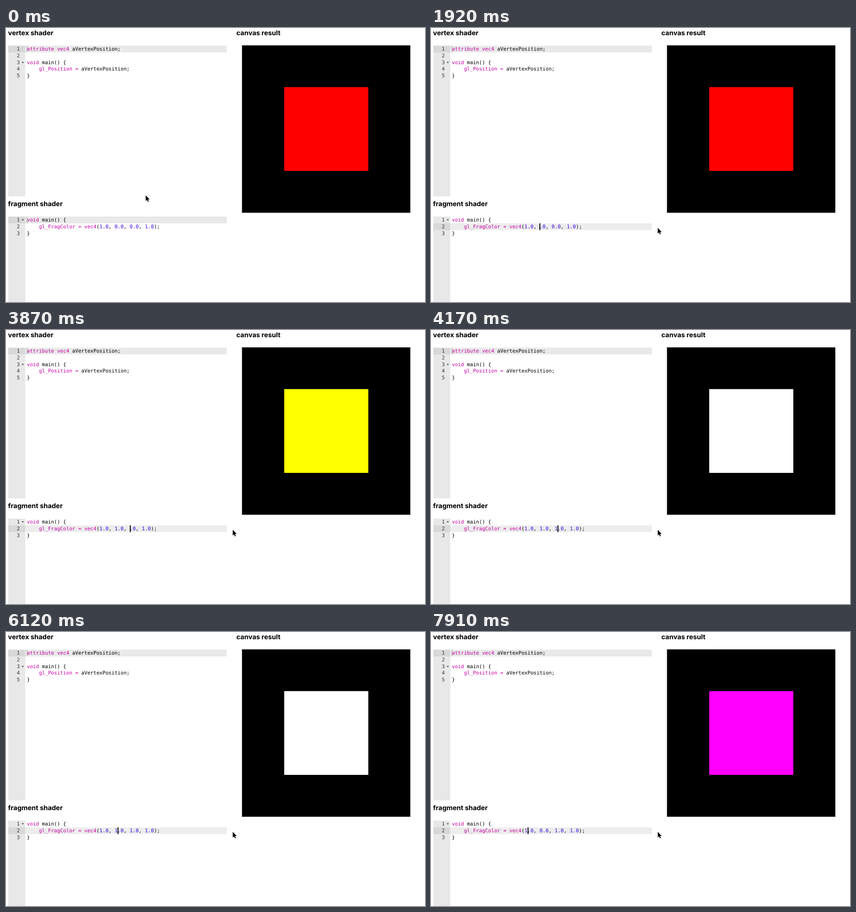
An HTML page with a canvas that plays this animation: 924x606 px, repeating every 8 s.

```html
<!DOCTYPE html>
<html lang="en">
<head>
<meta charset="utf-8">
<title>Shader editor</title>
<style>
  html, body { margin: 0; width: 100%; height: 100%; overflow: hidden; background: #fff; }
  canvas { display: block; }
</style>
</head>
<body>
<canvas id="stage" width="924" height="606"></canvas>
<script>
const ctx = document.getElementById('stage').getContext('2d');
const LOOP = 8000, ROW = 14.8, COL = 6.67, LEFT = 46;
const HEADING = '700 14.8px Inter, "Open Sans", sans-serif';
const CODE = '11.1px "DejaVu Sans Mono", "Liberation Mono", monospace';
const KEYWORD = '#c800a4', NUMBER = '#3a00dc';
const TOKENS = /(attribute|void|vec4|gl_\w+|=)|(\d*\.\d+)|./g;

const VERTEX = [
  'attribute vec4 aVertexPosition;',
  '',
  'void main() {',
  '    gl_Position = aVertexPosition;',
  '}'
];

const START = {
  mouse: ['arrow', 308, 370], line: 0, col: 0, caret: true,
  g: '0', b: '0', fill: '#f00'
};

// Each step changes part of the editor state at a given time.
const STEPS = [
  [150, { mouse: ['arrow', 299, 386] }],
  [290, { mouse: ['beam', 281, 432] }],
  [440, { mouse: ['beam', 271, 453] }],
  [730, { mouse: ['beam', 247, 441], line: 1, col: 30 }],
  [880, { mouse: ['beam', 310, 442] }],
  [1030, { mouse: ['beam', 420, 444] }],
  [1170, { mouse: ['arrow', 500, 442] }],
  [1320, { caret: false }],
  [1770, { caret: true }],
  [1920, { g: '', col: 29 }],
  [2070, { g: '1', col: 30, fill: '#ff0' }],
  [2670, { caret: false }],
  [2820, { caret: true, col: 31 }],
  [2970, { col: 32 }],
  [3270, { col: 34 }],
  [3570, { col: 35 }],
  [3870, { b: '', col: 34 }],
  [4170, { b: '1', col: 35, fill: '#fff' }],
  [4770, { caret: false }],
  [5070, { caret: true }],
  [5520, { col: 34 }],
  [5670, { col: 33 }],
  [5820, { col: 32 }],
  [5970, { col: 31 }],
  [6120, { col: 30 }],
  [6420, { g: '', col: 29, fill: '#f0f' }],
  [6570, { g: '0', col: 30 }],
  [7170, { col: 29 }],
  [7310, { col: 28 }],
  [7610, { col: 27 }],
  [7760, { col: 26 }],
  [7910, { col: 25 }]
];

function stateAt(t) {
  const state = { ...START };
  for (const [at, change] of STEPS) {
    if (at > t) break;
    Object.assign(state, change);
  }
  return state;
}

function rect(x, y, w, h, color) {
  ctx.fillStyle = color;
  ctx.fillRect(x, y, w, h);
}

function heading(text, x, y) {
  ctx.font = HEADING;
  ctx.fillStyle = '#000';
  ctx.fillText(text, x, y);
}

function codeLine(text, y) {
  for (const m of text.matchAll(TOKENS)) {
    ctx.fillStyle = m[1] ? KEYWORD : m[2] ? NUMBER : '#000';
    [...m[0]].forEach((c, i) => ctx.fillText(c, LEFT + (m.index + i) * COL, y));
  }
}

function foldMark(x, y) {
  ctx.fillStyle = '#444';
  ctx.beginPath();
  ctx.moveTo(x - 2.5, y - 1);
  ctx.lineTo(x + 2.5, y - 1);
  ctx.lineTo(x, y + 2);
  ctx.fill();
}

function editor(lines, top, height, active, activeColor) {
  const rowTop = i => Math.round(top + i * ROW);
  const y = rowTop(active), h = rowTop(active + 1) - y;
  rect(5, top, 37.5, height, '#e8e8e8');
  rect(5, y, 37.5, h, '#d8d8d8');
  rect(42.5, y, 444.5, h, activeColor);
  ctx.font = CODE;
  lines.forEach((text, i) => {
    const base = rowTop(i) + 11;
    ctx.fillStyle = '#333';
    ctx.fillText(String(i + 1), 23.7, base);
    if (text.endsWith('{')) foldMark(37, base - 4);
    codeLine(text, base);
  });
}

function arrow(x, y) {
  ctx.beginPath();
  ctx.moveTo(x, y);
  for (const [dx, dy] of [[0, 12.6], [2.8, 10], [4.8, 14.6], [6.8, 13.8], [4.9, 9.2], [8.8, 9.2]]) {
    ctx.lineTo(x + dx, y + dy);
  }
  ctx.closePath();
  ctx.strokeStyle = '#fff';
  ctx.lineWidth = 2;
  ctx.stroke();
  ctx.fillStyle = '#000';
  ctx.fill();
}

function beam(x, y) {
  ctx.strokeStyle = '#222';
  ctx.lineWidth = 1;
  ctx.beginPath();
  for (const s of [-1, 1]) {
    ctx.moveTo(x - 2.5, y + s * 7.5);
    ctx.quadraticCurveTo(x + 0.5, y + s * 7.5, x + 0.5, y + s * 5);
    ctx.quadraticCurveTo(x + 0.5, y + s * 7.5, x + 3.5, y + s * 7.5);
  }
  ctx.moveTo(x + 0.5, y - 6);
  ctx.lineTo(x + 0.5, y + 6);
  ctx.stroke();
}

function draw(t) {
  const s = stateAt(t);
  const focused = s.line > 0;
  const idle = 'rgba(0,0,0,.3)';
  const fragment = [
    'void main() {',
    `    gl_FragColor = vec4(1.0, ${s.g}.0, ${s.b}.0, 1.0);`,
    '}'
  ];

  rect(0, 0, 924, 606, '#fff');
  heading('vertex shader', 4.6, 15.5);
  heading('fragment shader', 4.6, 393.5);
  heading('canvas result', 508, 15.5);

  editor(VERTEX, 39, 333.5, 0, '#e9e9e9');
  rect(LEFT, 39, 1, 15, idle);
  editor(fragment, 417, 189, s.line, focused ? '#ededed' : '#e9e9e9');
  if (!focused) rect(LEFT, 417, 1, 15, idle);
  else if (s.caret) rect(Math.round(LEFT + s.col * COL), 432, 2, 15, '#000');

  rect(520, 38, 372, 371, '#666');
  rect(521, 39, 370, 369, '#000');
  rect(613.5, 130.7, 185.5, 185.3, s.fill);

  const [kind, x, y] = s.mouse;
  (kind === 'arrow' ? arrow : beam)(x, y);
}

ctx.textRendering = 'geometricPrecision';
const begin = performance.now();
function tick() {
  draw((performance.now() - begin) % LOOP);
  requestAnimationFrame(tick);
}
tick();
</script>
</body>
</html>
```
